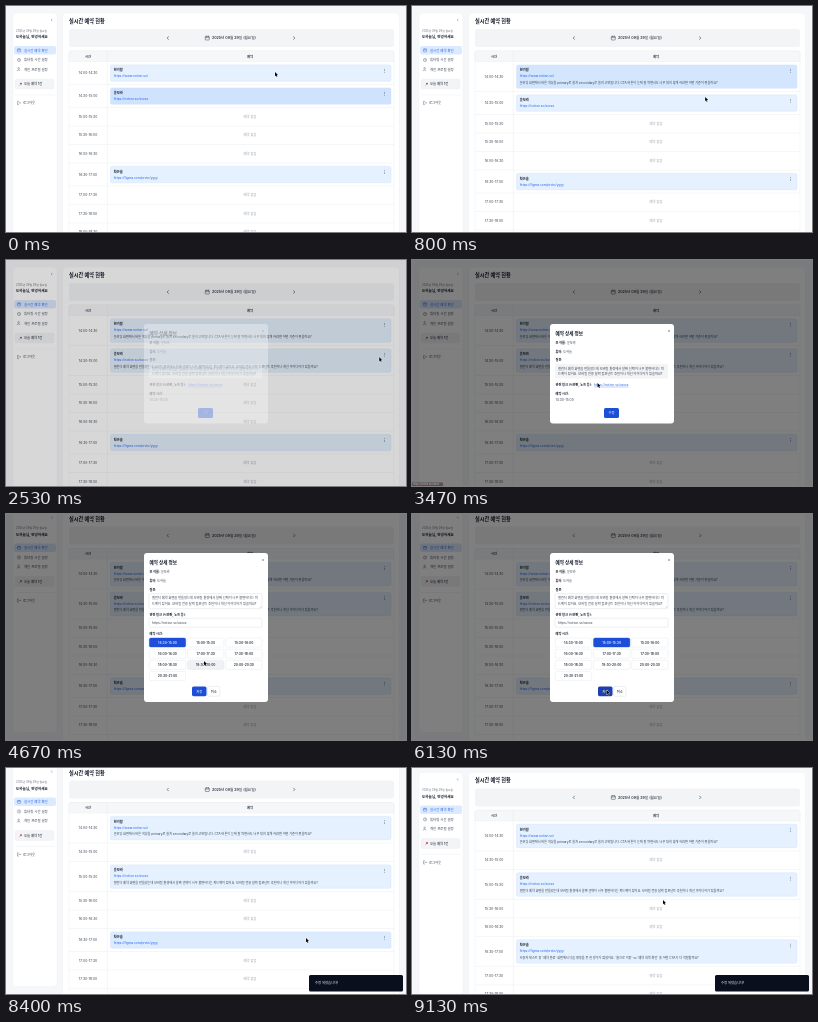
An HTML page with a canvas for the animation above (9200 ms loop, 400 by 226 pixels).

```html
<!DOCTYPE html>
<html lang="ko">
<head>
<meta charset="utf-8">
<title>실시간 예약 현황</title>
<style>
html, body { margin: 0; width: 100%; height: 100%; overflow: hidden; background: #f6f7f9; }
canvas { display: block; width: 400px; height: 226px; }
</style>
</head>
<body>
<canvas></canvas>
<script>
const LOOP = 9200;
const FONT = 'Inter, "Noto Sans CJK KR", "Noto Sans CJK", sans-serif';
const BLUE = '#1d4ed8', LINK = '#2563eb', INK = '#111827', DIM = '#4b5563', PALE = '#9ca3af', RULE = '#e5e7eb';
const canvas = document.querySelector('canvas');
const ctx = canvas.getContext('2d');
const scale = window.devicePixelRatio || 1;
canvas.width = 400 * scale;
canvas.height = 226 * scale;

// time, x, y of the pointer tip
const path = [
  [-200, 262, 90], [-65, 265, 88], [0, 269, 66], [400, 272, 69], [530, 272, 69],
  [930, 300, 98], [1270, 300, 98], [1670, 382, 101.5], [2030, 378, 94], [2200, 378, 94],
  [2330, 374, 97], [2500, 374, 97], [3330, 189, 124], [3470, 185.5, 123],
  [3870, 199, 152], [4330, 199, 152], [4600, 198, 147], [4670, 198, 147],
  [5130, 197, 129], [5670, 197, 129], [6070, 194.5, 176], [6930, 194.5, 176],
  [7250, 338, 112], [7470, 343, 111], [7730, 343, 108], [8000, 343, 108],
  [8370, 300, 170], [8770, 300, 170], [9130, 251, 132], [9200, 249, 130]
];

const people = [
  { name: '한가람', url: 'https://www.notion.so/', open: t => t >= 500,
    text: '온보딩 화면에서 버튼 색상을 primary로 쓸지 secondary로 쓸지 고민됩니다. CTA 버튼이 눈에 잘 띄면서도 너무 튀지 않게 하려면 어떤 기준이 좋을까요?' },
  { name: '윤보라', url: 'https://notion.so/xxxxx', open: t => t >= 1000 && t < 6930 || t >= 8000,
    text: '캘린더 예약 화면을 만들었는데 모바일 환경에서 날짜 선택이 너무 불편하다는 피드백이 있어요. 모바일 전용 달력 컴포넌트 추천이나 개선 아이디어가 있을까요?' },
  { name: '차은솔', url: 'https://figma.com/proto/yyyy', open: t => t >= 8460,
    text: "사용자 테스트 중 '예약 완료' 화면에서 다음 행동을 못 한 경우가 많았어요. '홈으로 이동' vs '예약 내역 확인' 중 어떤 CTA가 더 적절할까요?" }
];
const options = ['14:30-15:00', '15:00-15:30', '15:30-16:00', '16:00-16:30', '17:00-17:30',
  '17:30-18:00', '18:00-18:30', '19:30-20:00', '20:00-20:30', '20:30-21:00'];

const clamp = v => Math.max(0, Math.min(1, v));
const smooth = v => { v = clamp(v); return v * v * (3 - 2 * v); };
const mix = (a, b, k) => `rgb(${a.map((v, i) => Math.round(v + (b[i] - v) * k))})`;
const inside = ([px, py], x, y, w, h) => px >= x && px < x + w && py >= y && py < y + h;

function pointer(t) {
  let i = 1;
  while (i < path.length - 1 && path[i][0] < t) i++;
  const [t0, x0, y0] = path[i - 1], [t1, x1, y1] = path[i];
  const k = smooth((t - t0) / (t1 - t0));
  return [x0 + (x1 - x0) * k, y0 + (y1 - y0) * k];
}

function scrollAt(t) {
  return 10.5 * (smooth((t - 3930) / 200) - clamp((t - 8770) / 480));
}

function text(s, x, y, size, color = INK, weight = 400, align = 'left') {
  ctx.font = `${weight} ${size}px ${FONT}`;
  ctx.fillStyle = color;
  ctx.textAlign = align;
  ctx.fillText(s, x, y + size * 0.36);
  return ctx.measureText(s).width;
}

function box(x, y, w, h, r, fill, stroke) {
  ctx.beginPath();
  ctx.roundRect(x, y, w, h, r);
  if (fill) { ctx.fillStyle = fill; ctx.fill(); }
  if (stroke) { ctx.strokeStyle = stroke; ctx.lineWidth = 0.4; ctx.stroke(); }
}

function line(points, color = INK, width = 0.5) {
  ctx.beginPath();
  for (let i = 0; i < points.length; i += 2) ctx.lineTo(points[i], points[i + 1]);
  ctx.strokeStyle = color;
  ctx.lineWidth = width;
  ctx.stroke();
}

function dot(x, y, r, fill, stroke) {
  box(x - r, y - r, 2 * r, 2 * r, r, fill, stroke);
}

function calendar(x, y, s, color) {
  box(x - s / 2, y - s * 0.4, s, s * 0.9, s * 0.15, null, color);
  line([x - s / 2, y - s * 0.1, x + s / 2, y - s * 0.1], color, 0.4);
  for (const dx of [-s / 4, s / 4]) line([x + dx, y - s * 0.6, x + dx, y - s * 0.25], color, 0.4);
}

function sidebar() {
  box(7, 7, 44, 222, 4, '#fff', '#eceef1');
  line([46.3, 12.8, 45.2, 14, 46.3, 15.2], DIM, 0.4);
  text('2025년 09월 29일 월요일', 10, 25, 2.75, '#6b7280');
  text('도하늘님, 안녕하세요', 10, 31, 3.6, INK, 700);
  box(8, 40, 42, 8.6, 2, '#dbeafe');
  calendar(13, 44.3, 3.2, LINK);
  text('실시간 예약 확인', 18, 44.4, 3.4, LINK, 500);
  dot(13, 54, 1.6, null, DIM);
  line([13, 53, 13, 54, 13.8, 54.4], DIM, 0.4);
  text('튜터링 시간 설정', 18, 54, 3.4, '#374151');
  dot(12.6, 62.3, 0.8, null, DIM);
  line([11.2, 65, 11.6, 64, 13.5, 64, 14, 65], DIM, 0.4);
  text('개인 프로필 설정', 18, 63.5, 3.4, '#374151');
  box(9, 73, 39, 10, 2, '#f3f4f6', '#eceef1');
  line([13.2, 79.8, 14.6, 78.2], '#6b7280', 0.4);
  dot(15, 77.6, 0.9, '#dc2626');
  text('오늘 예약 1건', 18, 78, 3.3, INK, 500);
  line([9, 89, 49, 89], RULE, 0.4);
  line([13, 95.4, 11.5, 95.4, 11.5, 98.6, 13, 98.6], DIM, 0.4);
  line([12.6, 97, 14.8, 97, 14, 96.2], DIM, 0.4);
  text('로그아웃', 17, 97, 3.3, '#374151');
}

function card(p, y, h, heat) {
  box(104.5, y + 3.4, 280.5, h - 6.6, 1.6, mix([229, 241, 254], [207, 227, 254], heat), '#c9dffb');
  text(p.name, 107.7, y + 8.6, 3.3, INK, 600);
  text(p.url, 107.7, y + 14.6, 3.2, LINK);
  if (h > 25) text(p.text, 107.7, y + 21.3, 3.1, '#374151');
  for (let i = -1; i < 2; i++) dot(378.6, y + 9.2 + i * 1.5, 0.42, '#374151');
}

function table(t, scroll) {
  box(56.5, 7, 337, 260, 4, '#fff', '#eceef1');
  text('실시간 예약 현황', 63, 15.2, 5.2, INK, 700);
  box(63, 23, 325, 18, 2.5, '#f3f4f6');
  line([162.6, 30.4, 161.2, 32, 162.6, 33.6]);
  line([287.4, 30.4, 288.8, 32, 287.4, 33.6]);
  calendar(201.3, 32, 4, INK);
  text('2025년 09월 29일 (월요일)', 206, 32, 3.65, INK, 500);
  box(63, 45, 325, 230, 2, '#fff', RULE);
  box(63, 45, 325, 10.5, [2, 2, 0, 0], '#f6f7f9', RULE);
  text('시간', 82, 50.4, 3.3, '#374151', 600, 'center');
  text('예약', 244, 50.4, 3.3, '#374151', 600, 'center');

  const slots = { 0: 0, 5: 2, [t < 6930 ? 1 : 2]: 1 };
  const clock = n => `${14 + (n >> 1)}:${n % 2 ? '30' : '00'}`;
  const modal = t > 2500 && t < 6350;
  let y = 55.5;
  for (let i = 0; i < 11; i++) {
    const p = people[slots[i]];
    const h = !p ? 18.5 : p.open(t) ? 30 : 23;
    text(`${clock(i)}-${clock(i + 1)}`, 82, y + h / 2, 3.35, '#374151', 400, 'center');
    if (p) {
      let heat = 0;
      // hover colour trails the pointer
      for (let k = 0; k < 5 && !modal; k++)
        heat += inside(pointer(t - 70 - k * 30), 104.5, y + 3.4 - scroll, 280.5, h - 6.6) / 5;
      card(p, y, h, heat);
    } else text('예약 없음', 244, y + h / 2, 3.3, PALE, 400, 'center');
    y += h;
    line([63, y, 388, y], RULE, 0.4);
  }
  line([101.3, 45, 101.3, 270], RULE, 0.4);
}

function field(label, value, y) {
  const w = text(label, 143.5, y, 3.15, INK, 600);
  if (value) text(value, 144.5 + w, y, 3.15, '#374151');
}

function question(y) {
  const cut = people[1].text.indexOf('드백');
  text(people[1].text.slice(0, cut), 146, y, 3.2, '#374151');
  text(people[1].text.slice(cut), 146, y + 5.3, 3.2, '#374151');
}

function button(label, x, y, w, h, fill, color, stroke) {
  box(x, y, w, h, 1.6, fill, stroke);
  text(label, x + w / 2, y + h / 2, 3.3, color, 500, 'center');
}

function panel(y, h, gap) {
  box(138, y, 124, h, 3, '#fff');
  text('예약 상세 정보', 143.5, y + 9, 4.6, INK, 700);
  line([256, y + 6, 258, y + 8], DIM, 0.4);
  line([258, y + 6, 256, y + 8], DIM, 0.4);
  field('조 이름:', people[1].name, y + 19);
  field('튜터:', '도하늘', y + 19 + gap);
  field('질문:', '', y + 19 + gap * 2);
}

function viewPanel(mouse) {
  panel(64, 99.5, 8.6);
  box(143, 104, 113, 14.5, 1.5, '#f3f4f6');
  question(108.4);
  field('관련 링크 (시안판, 노트 등):', '', 125.2);
  const w = text(people[1].url, 182, 125.2, 3.2, LINK);
  line([182, 127, 182 + w, 127], LINK, 0.3);
  field('예약 시간:', '', 134);
  text('14:30-15:00', 143.5, 139.8, 3.25, '#374151');
  const hot = inside(mouse, 192, 148, 15, 10);
  button('수정', 192, 148, 15, 10, hot ? '#1e40af' : BLUE, '#fff');
}

function editPanel(t, mouse) {
  panel(39, 149, 9);
  box(143, 79.7, 113, 15, 1.5, '#fff', '#d1d5db');
  question(84.2);
  line([253.4, 94, 255.2, 92.2], PALE, 0.3);
  line([254.4, 94, 255.2, 93.2], PALE, 0.3);
  field('관련 링크 (시안판, 노트 등):', '', 100.8);
  box(143, 104.2, 113, 9, 1.5, '#fff', '#d1d5db');
  text(people[1].url, 146, 108.7, 3.2, '#374151');
  field('예약 시간:', '', 119.4);
  const chosen = t < 5400 ? 0 : 1;
  options.forEach((label, i) => {
    const x = 143.3 + (i % 3) * 38.2, y = 124 + Math.floor(i / 3) * 11.2;
    const on = i === chosen;
    const fill = on ? BLUE : inside(mouse, x, y, 36.4, 9) ? '#f0f1f4' : '#fff';
    button(label, x, y, 36.4, 9, fill, on ? '#fff' : INK, on ? BLUE : '#dfe2e7');
  });
  const hot = inside(mouse, 186, 172.5, 14.5, 9.7);
  button('저장', 186, 172.5, 14.5, 9.7, hot ? '#1e40af' : BLUE, '#fff');
  button('취소', 201.5, 172.5, 12.5, 9.7, '#fff', INK, '#d1d5db');
}

function arrow([x, y]) {
  ctx.save();
  ctx.translate(x, y);
  ctx.beginPath();
  for (const [px, py] of [[0, 0], [0, 4.3], [1, 3.4], [1.7, 5], [2.4, 4.7], [1.7, 3.2], [3, 3.1]]) ctx.lineTo(px, py);
  ctx.closePath();
  ctx.strokeStyle = '#fff';
  ctx.lineWidth = 0.7;
  ctx.stroke();
  ctx.fillStyle = '#000';
  ctx.fill();
  ctx.restore();
}

function draw(t) {
  const mouse = pointer(t), scroll = scrollAt(t);
  ctx.setTransform(scale, 0, 0, scale, 0, 0);
  ctx.fillStyle = '#f6f7f9';
  ctx.fillRect(0, 0, 400, 226);
  ctx.save();
  ctx.translate(0, -scroll);
  sidebar();
  table(t, scroll);
  ctx.restore();

  const shown = Math.min(clamp((t - 2490) / 130), clamp((6420 - t) / 120));
  if (shown > 0) {
    ctx.globalAlpha = shown;
    ctx.fillStyle = 'rgba(0, 0, 0, 0.5)';
    ctx.fillRect(0, 0, 400, 226);
    if (t < 4000) viewPanel(mouse);
    else editPanel(t, mouse);
    ctx.globalAlpha = 1;
    if (t < 4000 && inside(mouse, 182, 122, 36, 6)) {
      box(0, 222.5, 31, 4, [0, 1, 0, 0], '#5b5154');
      text(people[1].url, 1, 224.6, 2.4, '#c9b6b8');
    }
  }
  if (t >= 6330) {
    ctx.globalAlpha = clamp((t - 6290) / 100);
    box(303, 207, 94, 16.5, 1.5, '#0a0f1e');
    text('수정 되었습니다!', 309, 215.3, 3.3, '#fff', 500);
    ctx.globalAlpha = 1;
  }
  arrow(mouse);
}

const start = performance.now();
function frame() {
  draw((performance.now() - start) % LOOP);
  requestAnimationFrame(frame);
}
frame();
</script>
</body>
</html>
```
